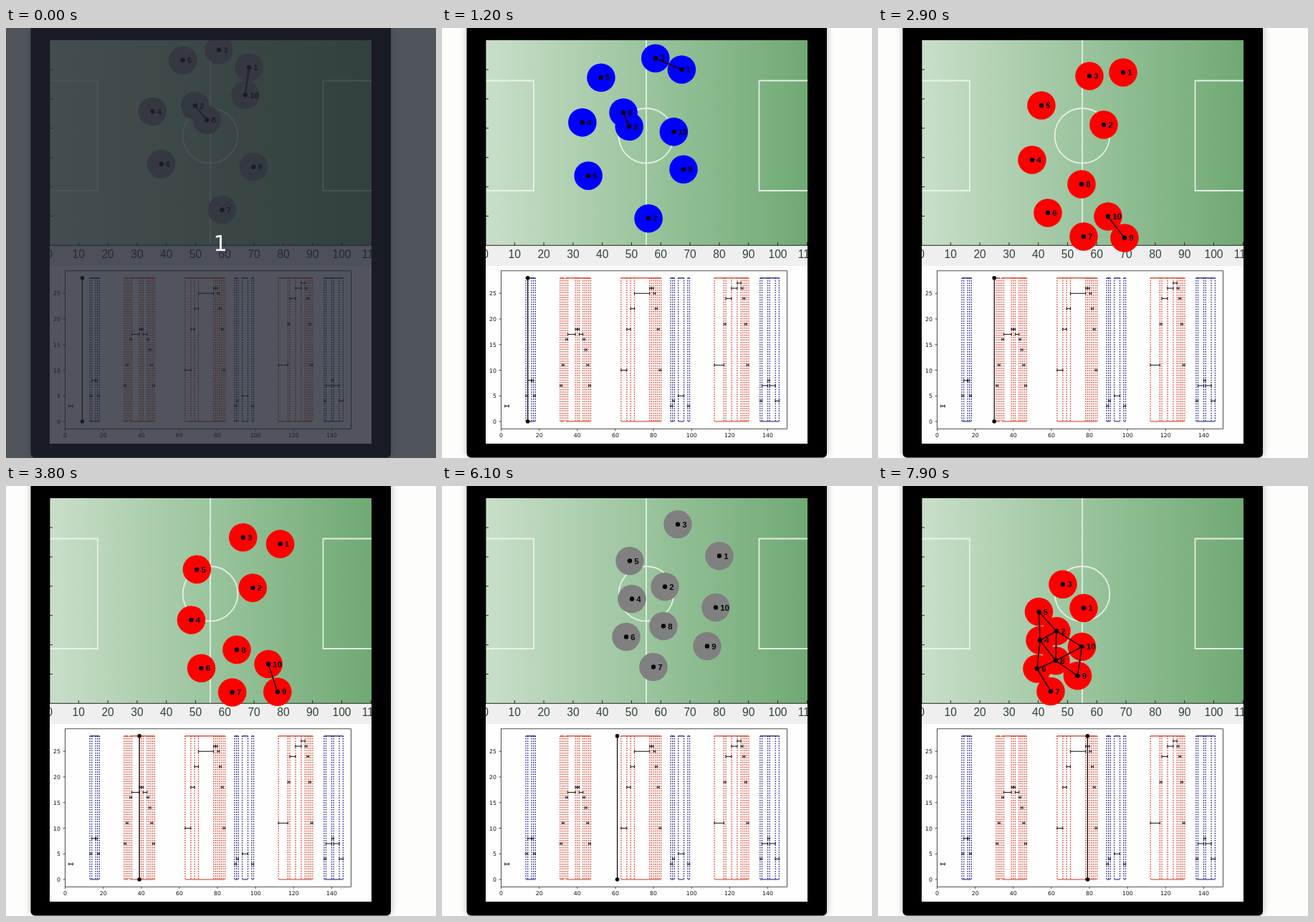
Write an HTML page that moves like this. It is 600 px wide and 600 px high and loops after 8000 ms.

```html
<!DOCTYPE html>
<html lang="en">
<head>
<meta charset="utf-8">
<title>Team spread</title>
<style>
  html, body { margin: 0; width: 100%; height: 100%; overflow: hidden; background: #fdfefb; }
  svg { display: block; width: 100%; height: 100%; }
  .axis { font: 15.6px "Liberation Sans", Arial, sans-serif; fill: #2f4436; text-anchor: middle; }
  .tick { font: 7.8px "DejaVu Sans", sans-serif; fill: #111; text-anchor: middle; }
  .tick.y { text-anchor: end; }
  .label { font: bold 11.5px "Liberation Sans", Arial, sans-serif; fill: #080808; }
  .count { font: 30px "DejaVu Sans", sans-serif; fill: #fff; text-anchor: middle; }
  .lines { fill: none; stroke: #edf6ed; stroke-width: 1.8; stroke-opacity: .9; }
  .ink { fill: none; stroke: #222; }
</style>
</head>
<body>
<svg viewBox="0 0 600 600">
  <defs>
    <linearGradient id="grass">
      <stop offset="0" stop-color="#c9dec9"/>
      <stop offset=".5" stop-color="#9ac49d"/>
      <stop offset="1" stop-color="#70a974"/>
    </linearGradient>
    <filter id="soft" x="-10%" width="120%"><feGaussianBlur stdDeviation="4"/></filter>
    <clipPath id="screen"><rect x="61" y="17" width="449" height="563"/></clipPath>
  </defs>
  <rect width="600" height="600" fill="#fdfefb"/>
  <rect x="33" y="-20" width="506" height="619" rx="6" opacity=".2" filter="url(#soft)"/>
  <rect x="34.5" y="-20" width="502.5" height="619.4" rx="6"/>
  <g clip-path="url(#screen)">
    <rect x="61" y="17" width="449" height="563" fill="#fefefe"/>
    <rect x="61" y="303" width="449" height="29" fill="#eeefee"/>
    <rect x="61" y="17" width="449" height="286" fill="url(#grass)"/>
    <path class="lines" d="M285 17V303M60 73.5H128V227H60M511 73.5H442.5V227H511"/>
    <circle class="lines" cx="285" cy="150.3" r="38.3"/>
    <path class="ink" d="M61 17V303.3H510"/>
    <g id="pitchAxis"></g>
    <g id="chart"></g>
    <g id="slider">
      <path d="M0 348.8V549" stroke="#000" stroke-width="1.2"/>
      <circle cy="348.8" r="2.8"/><circle cy="549" r="2.8"/>
    </g>
    <g id="discs"></g>
    <path id="links" fill="none"/>
    <g id="marks"></g>
  </g>
  <g id="overlay">
    <rect width="600" height="600" fill="#21242f" fill-opacity=".78"/>
    <text class="count" x="299" y="311">1</text>
  </g>
</svg>
<script>
const LOOP = 8000, STEP = 100, REACH = 42;
const $ = id => document.getElementById(id);

function add(parent, tag, attrs, text) {
  const el = document.createElementNS('http://www.w3.org/2000/svg', tag);
  for (const key in attrs) el.setAttribute(key, attrs[key]);
  if (text !== undefined) el.textContent = text;
  parent.appendChild(el);
  return el;
}

// Pitch axis
for (let n = 0; n <= 11; n++) {
  const x = 60.5 + 40.8 * n;
  add($('pitchAxis'), 'text', { class: 'axis', x, y: 321.2 }, n * 10);
  add($('pitchAxis'), 'path', { class: 'ink', d: `M${x} 303v-4` });
  if (n < 6) add($('pitchAxis'), 'path', { class: 'ink', d: `M61 ${58 + 40.9 * n}h4` });
}

// Chart: each passage is a chain of steps, a negative step being a gap.
// The marks climb to the passage's peak row and fall back.
const X = v => 82.5 + 2.657 * v;
const Y = v => 549 - 7.15 * v;
const RED = '#d5331b', BLUE = '#10108a';
const passages = [
  { start: 2, peak: 3, steps: [2] },
  { color: BLUE, start: 13, peak: 8, steps: [1, 2, 1, 1] },
  { color: RED, start: 31, peak: 18, steps: [1, 1, -1, 1, 4, 1, 1, 2, 1, 1, 1, 1] },
  { color: RED, start: 63, peak: 26, steps: [3, 2, 2, 8, 1, 1, 1, 1, 1, 1] },
  { color: BLUE, start: 89, peak: 5, steps: [1, 1, -2, 3, -2, 1] },
  { color: RED, start: 112, peak: 27, steps: [5, 1, 3, 3, 2, 1, 1, 1, 1] },
  { color: BLUE, start: 136, peak: 8, steps: [1, 3, 1, 3, 2] },
];

const chart = $('chart');
for (const { color, start, peak, steps } of passages) {
  let a = start, dots = `M${X(a)} ${Y(28)}V${Y(0)}`, edges = '', marks = '';
  steps.forEach((step, i) => {
    const b = a + Math.abs(step);
    dots += `M${X(b)} ${Y(28)}V${Y(0)}`;
    if (step > 0) {
      const y = Y(Math.round(peak * Math.sqrt(Math.sin(Math.PI * (i + .5) / steps.length))));
      edges += `M${X(a)} ${Y(28)}H${X(b)}M${X(a)} ${Y(0)}H${X(b)}`;
      marks += `M${X(a)} ${y}H${X(b)}M${X(a)} ${y - 2}v4M${X(b)} ${y - 2}v4`;
    }
    a = b;
  });
  if (color) {
    add(chart, 'path', { d: dots, stroke: color, 'stroke-width': 1.3, 'stroke-dasharray': '1.5 1.8' });
    add(chart, 'path', { d: edges, stroke: color, 'stroke-width': 1.2 });
  }
  add(chart, 'path', { d: marks, stroke: '#111' });
}
add(chart, 'rect', { class: 'ink', x: 82.5, y: 338.8, width: 399, height: 220.5, 'stroke-width': .8 });
for (let v = 0; v <= 140; v += 20) {
  add(chart, 'path', { class: 'ink', d: `M${X(v)} 559.3v3`, 'stroke-width': .8 });
  add(chart, 'text', { class: 'tick', x: X(v), y: 571 }, v);
}
for (let v = 0; v <= 25; v += 5) {
  add(chart, 'path', { class: 'ink', d: `M82.5 ${Y(v)}h-3`, 'stroke-width': .8 });
  add(chart, 'text', { class: 'tick y', x: 76, y: Y(v) + 3 }, v);
}

// Team centre as [clock, x, y]
const centre = [
  [7, 294, 130], [9, 283, 121.5], [19, 267, 155], [30, 287, 188],
  [49, 356, 184], [61, 317, 160.5], [79, 252, 217.5],
];

// Each player's offset from the centre at the moments in `phases`
const phases = [8, 19, 30, 55];
const offsets = [
  [[55, -64], [66, -92], [55, -126], [70, -63]],
  [[-21, -15], [-1, 4], [28, -53], [-6, -20]],
  [[12, -90], [32, -100], [8, -121], [12, -107]],
  [[-79, -5], [-74, -5], [-72, -4], [-52, -3]],
  [[-34, -78], [-60, -63], [-59, -80], [-55, -56]],
  [[-66, 68], [-67, 70], [-50, 70], [-60, 50]],
  [[19, 133], [13, 124], [0, 103], [-22, 92]],
  [[0, 11], [-28, -31], [-3, 30], [-8, 35]],
  [[62, 74], [66, 57], [57, 105], [53, 63]],
  [[51, -35], [50, 39], [34, 75], [65, 9]],
];
const routes = offsets.map(list => list.map((p, i) => [phases[i], ...p]));

const players = offsets.map((_, i) => {
  const disc = add($('discs'), 'circle', { r: 19.8 });
  const mark = add($('marks'), 'g', {});
  add(mark, 'circle', { r: 3.2 });
  add(mark, 'text', { class: 'label', x: 6.2, y: 4.2 }, i + 1);
  return { disc, mark };
});

// Smooth curve through [time, x, y] keys, held at both ends
function along(keys, v) {
  const last = keys.length - 1;
  v = Math.min(Math.max(v, keys[0][0]), keys[last][0]);
  let i = 0;
  while (i < last - 1 && v > keys[i + 1][0]) i++;
  const span = keys[i + 1][0] - keys[i][0], u = (v - keys[i][0]) / span, w = 1 - u;
  return [1, 2].map(c => {
    const slope = n => {
      const a = keys[Math.max(n - 1, 0)], b = keys[Math.min(n + 1, last)];
      return (b[c] - a[c]) / (b[0] - a[0]);
    };
    return keys[i][c] * (1 + 2 * u) * w * w + keys[i + 1][c] * u * u * (3 - 2 * u)
      + span * u * w * (slope(i) * w - slope(i + 1) * u);
  });
}

// The team draws together towards the end
function place(route, v) {
  const [cx, cy] = along(centre, v), [dx, dy] = along(route, v);
  const squeeze = Math.max(0, (v - 61) / 18);
  return [cx + dx * (1 - .5 * squeeze), cy + dy * (1 - .25 * squeeze)];
}

function clock(k) {
  if (k === 0) return 9;
  if (k === 45 || k === 75) k--;
  return k + (k < 15 ? 2 : k < 60 ? 1 : 0);
}

// Discs take the colour of the passage being played
function discColor(v) {
  const now = passages.find(p => p.color && v + 1 >= p.start
    && v + 1 <= p.steps.reduce((sum, s) => sum + Math.abs(s), p.start));
  return !now ? '#808080' : now.color === RED ? '#f00' : '#00f';
}

function render(k) {
  const v = clock(k), color = discColor(v), grey = color === '#808080';
  const spots = routes.map(r => place(r, v));
  let d = '';
  spots.forEach(([x, y], i) => {
    const move = `translate(${x} ${y})`;
    players[i].disc.setAttribute('transform', move);
    players[i].mark.setAttribute('transform', move);
    for (const [a, b] of spots.slice(i + 1))
      if (Math.hypot(a - x, b - y) < REACH) d += `M${x} ${y}L${a} ${b}`;
  });
  $('discs').setAttribute('fill', color);
  $('links').setAttribute('d', d);
  $('links').setAttribute('stroke', grey ? '#333' : '#300');
  $('links').setAttribute('stroke-width', grey ? 2.5 : 1.8);
  $('slider').setAttribute('transform', `translate(${X(v)} 0)`);
  $('overlay').style.display = k === 0 ? '' : 'none';
}

let shown = 0;
const start = performance.now();
function tick(now) {
  const k = Math.floor(Math.max(0, now - start) % LOOP / STEP);
  if (k !== shown) render(shown = k);
  requestAnimationFrame(tick);
}
render(0);
requestAnimationFrame(tick);
</script>
</body>
</html>
```
